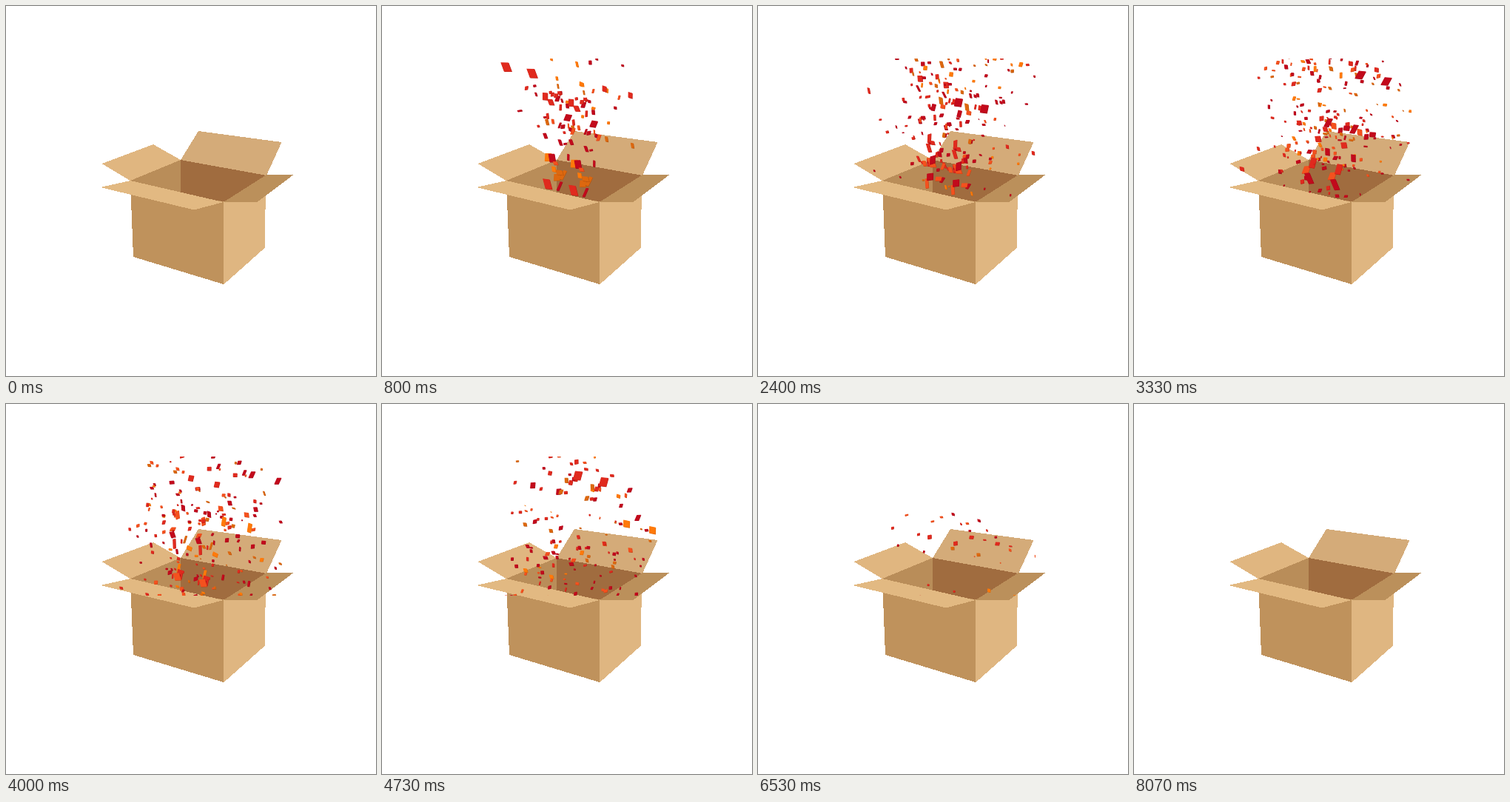
Animation, 500 px wide and 500 px high, one loop 8.16 s. Source, as an HTML page with a canvas:

```html
<!DOCTYPE html>
<html lang="en">
<head>
<meta charset="utf-8">
<title>Confetti box</title>
<style>
  html, body { margin: 0; width: 100%; height: 100%; overflow: hidden; background: #fff; }
  svg, canvas { position: absolute; left: 0; top: 0; width: 500px; height: 500px; }
</style>
</head>
<body>
<svg viewBox="0 0 500 500" shape-rendering="crispEdges">
  <path fill="#d4ab79" d="M260 169 372.500 184 352 229 236 208Z"/>
  <path fill="#e0b680" d="M129.500 213 199 187 236 208 168 236Z"/>
  <path fill="#b98d59" d="M236 208 236 252 168 236Z"/>
  <path fill="#a06c3f" d="M236 208 352 229 294 265 236 252Z"/>
  <path fill="#bf925c" d="M168.500 250 294 264 294 376 172 339Z"/>
  <path fill="#dfb681" d="M294 264 351 250 349.500 327 294 376.500Z"/>
  <path fill="#bb905b" d="M352 228 388.500 228 340 264.500 294 265Z"/>
  <path fill="#e2b982" d="M127.500 245 168 236 294 265 254 275.500Z"/>
</svg>
<canvas id="stage" width="500" height="500"></canvas>
<script>
const LOOP = 8160, STEP = 40, FIRST = 70, LAST = 8070;
const DRAG = 1.2, FALL = 140, DRIFT = 3;
const SOURCE = { x: 236, y: 242 };
const TWIN = { x: 35, y: 8.6 };          // every piece is thrown twice, side by side
const RED = 1, CRIMSON = 0, AMBER = 4;
const COLORS = ['#c20a1c', '#e02a1e', '#f4511e', '#dd680f', '#ff7a0a'];
const SHADES = ['#9c0616', '#b51c14', '#c93c10', '#b3500a', '#d96200'];

const ctx = document.getElementById('stage').getContext('2d');

let seed = 20;
function rand() {
  seed = (seed * 1664525 + 1013904223) >>> 0;
  return seed / 4294967296;
}
const between = (a, b) => a + (b - a) * rand();

// Share of a throw covered after `age` seconds of air drag.
const covered = age => 1 - Math.exp(-DRAG * age);
const sink = age => FALL * (age - covered(age) / DRAG);

function pickColor() {
  const r = rand();
  return r < .42 ? 0 : r < .64 ? 1 : r < .78 ? 2 : r < .9 ? 3 : 4;
}

function look(size, color) {
  return {
    size, color,
    tilt: between(-.2, .2),
    phase: between(0, 6.28), flip: between(3, 7),
    skew: between(-.3, .3)
  };
}

function randomPiece() {
  return {
    birth: .03 + 4.07 * rand() ** 1.3,
    x: SOURCE.x + between(-13, 13),
    y: SOURCE.y + between(-5, 5),
    reach: between(-110, 130) * rand() ** .4,
    lift: 130 + 285 * rand() ** .8,
    ...look(between(.65, 1.3), pickColor())
  };
}

// A large piece that passes through (x, y) at second `at`.
function largePiece([at, x, y, color, age]) {
  const c = covered(age);
  return {
    birth: at - age, x: SOURCE.x, y: SOURCE.y,
    reach: (x - SOURCE.x - DRIFT * age) / c,
    lift: (SOURCE.y - y + sink(age)) / c,
    ...look(1.9, color),
    phase: .4 - 4 * age, flip: 4, tilt: .1
  };
}

const pieces = Array.from({ length: 165 }, randomPiece).concat([
  [.8, 167, 81, RED, .6],
  [2.4, 271, 130, CRIMSON, .8],
  [3.33, 307, 92, CRIMSON, .8],
  [4.73, 265, 95, RED, .7],
  [4.73, 331, 163, AMBER, 1.3]
].map(largePiece));

function drawPiece(p, x, y, age) {
  const early = Math.exp(-DRAG * 1.5 * age);
  const size = p.size * (4.2 + 4 * early);
  const spin = p.phase + p.flip * age;
  const w = size * (.35 + .65 * Math.abs(Math.cos(spin * .7)));
  const h = size * (.3 + .7 * Math.abs(Math.cos(spin))) * (1 + .7 * early);
  const lean = p.reach / 250 * early;
  ctx.save();
  ctx.translate(x, y);
  ctx.rotate(p.tilt + lean);
  ctx.transform(1, p.skew * .4, p.skew, 1, 0, 0);
  ctx.fillStyle = SHADES[p.color];
  ctx.fillRect(-w / 2 + .5, -h / 2 + .5, w, h);
  ctx.fillStyle = COLORS[p.color];
  ctx.fillRect(-w / 2, -h / 2, w, h);
  ctx.restore();
}

function render(ms) {
  ctx.clearRect(0, 0, 500, 500);
  if (ms < FIRST || ms >= LAST) return;
  const t = (FIRST + Math.floor((ms - FIRST) / STEP) * STEP) / 1000;
  ctx.save();
  ctx.beginPath();
  ctx.rect(129, 71, 246, 188);
  ctx.clip();
  for (const p of pieces) {
    const age = t - p.birth;
    if (age < 0) continue;
    const c = covered(age);
    const x = p.x + p.reach * c + DRIFT * age;
    const y = p.y - p.lift * c + sink(age);
    if (y < 50 || y > 275) continue;
    drawPiece(p, x, y, age);
    drawPiece(p, x + TWIN.x, y + TWIN.y, age);
  }
  ctx.restore();
}

const start = performance.now();
function tick() {
  render((performance.now() - start) % LOOP);
  requestAnimationFrame(tick);
}
tick();
</script>
</body>
</html>
```
